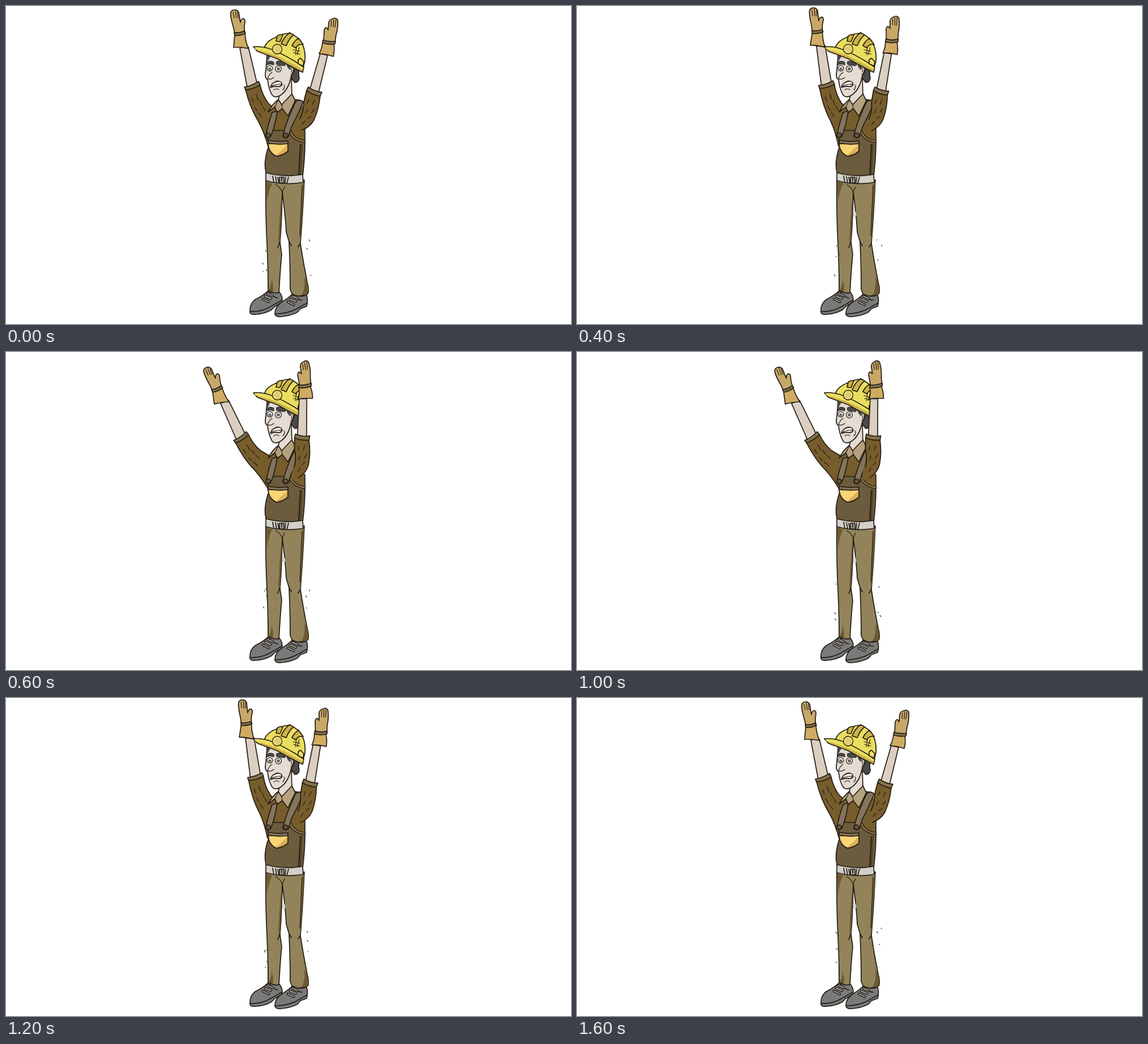
Recreate the animation shown at these times as an HTML page. Size 998 px wide and 561 px high, loop 1810 ms.

```html
<!DOCTYPE html>
<html lang="en">
<head>
<meta charset="utf-8">
<title>Worker waving</title>
<style>
  html, body { margin: 0; width: 100%; height: 100%; overflow: hidden; background: #fff; }
  svg { display: block; width: 998px; height: 561px; }
  path, circle { stroke: #231d14; stroke-width: 1.7; stroke-linejoin: round; stroke-linecap: round; }
  .line { fill: none; }
  .flat { stroke: none; }
  .thin { fill: none; stroke-width: 1.2; }
  .glove { fill: #c8a868; }
  .cuff { fill: #d0ab63; }
  .skin { fill: #dbcfc2; }
  .face { fill: #e4dcd2; }
  .shirt { fill: #775d2c; }
  .band { fill: #83704a; }
  .bib { fill: #6c5b3d; }
  .strap { fill: #83745c; }
  .pants { fill: #92835a; }
  .shade { fill: #6c5930; stroke: none; }
  .boot { fill: #7b7a7b; }
  .hat { fill: #eade60; }
  .hatShade { fill: #cdb348; }
  .hair { fill: #4a494b; }
  .lace { stroke: #aaa9a8; stroke-width: 1.9; fill: none; }
</style>
</head>
<body>
<svg viewBox="0 0 998 561">
  <g id="left">
    <path class="skin" d="M413 74L426 143L444 139L428 72Z"/>
    <path class="shirt flat" d="M423 147L449 140Q453 158 463 171L479 186L482 235L463 248Q456 222 446 204Q431 180 423 147Z"/>
    <path class="line" d="M463 248Q456 222 446 204Q431 180 423 147M449 140Q453 158 463 171L479 186"/>
    <path class="thin" d="M434 162l3 8M442 156l3 10M439 178l5 7M448 167l4 9M446 188l6 8M454 178l4 7"/>
    <path class="band" d="M421 143Q434 141 446 133L449 139Q437 147 423 148Z"/>
    <path class="glove" d="M404 48Q402 38 399 28Q396 16 397 11Q399 7 403 7Q408 6 411 11L414 29Q415 23 419 22Q423 23 422 29Q420 38 422 47Z"/>
    <path class="thin" d="M401 11L403 21M405 9L407 21M409 10L410 21"/>
    <path class="cuff" d="M404 51L402 73Q415 72 428 75Q423 62 422 49Z"/>
    <path class="band" d="M403 47Q413 48 421 44L423 48Q414 53 404 52Z"/>
  </g>

  <g id="legs">
    <path class="pants" d="M459 306Q458 360 461 420Q463 460 463 503Q472 510 482 508Q484 470 487 438L484 417Q487 380 488 328Q494 375 495 399L500 416Q502 460 502 500L506 510Q520 514 533 508Q536 501 532 487Q525 452 520 419Q524 370 527 307Z"/>
    <path class="shade" d="M460 310L470 313Q464 325 461 346ZM487 332L484 420L481 424Q482 375 487 332ZM524 313L527 310L520 419L519 404ZM464 502Q470 490 469 482Q473 492 471 508ZM522 510Q529 500 527 478Q534 490 534 502L531 510Z"/>
    <path class="line" d="M484 417L480 426M500 416L504 423M520 419L516 425"/>
    <path class="thin" d="M476 315Q484 319 488 328L492 319M523 316L519 405"/>
    <path class="boot" d="M464 502Q454 511 440 518Q430 526 431 539Q430 545 441 544Q457 543 469 536L475 530L487 523Q490 514 483 505Q476 509 464 502Z"/>
    <path class="boot" d="M506 508Q498 516 486 523Q475 531 475 542Q475 549 486 548Q502 547 515 540L520 534L531 530Q534 520 531 510Q518 515 506 508Z"/>
    <path class="line" d="M431 539Q450 540 466 531L487 519M475 543Q496 543 512 535L532 524M465 504Q472 514 480 515M508 510Q514 519 523 519"/>
    <path class="line" style="stroke-width:4.6" d="M454 517l10 5M458 512l10 4M462 507l9 4M498 522l10 5M502 517l10 4M506 512l9 4"/>
    <path class="lace" d="M454 517l10 5M458 512l10 4M462 507l9 4M498 522l10 5M502 517l10 4M506 512l9 4"/>
  </g>

  <g id="body">
    <path class="shirt flat" d="M464 186L480 172L505 163L519 166L527 183L528 246L463 249L458 226Z"/>
    <path class="line" d="M509 165L519 166M528 216L528 241"/>
    <path class="bib" d="M461 219L503 220Q508 235 528 241Q528 268 524 300Q490 305 463 298Q456 294 458 272Q460 257 464 248Z"/>
    <path class="line" style="stroke-width:5" d="M502 221Q507 236 527 239"/>
    <path class="line" style="stroke:#93794d;stroke-width:2.4" d="M502 221Q507 236 527 239"/>
    <path class="shade" style="fill:#51432c" d="M520 243L524 243L521 298L517 298Z"/>
    <path class="line" d="M520 244L517 297"/>
    <path class="flat" fill="#fbd474" d="M463 244L498 244L498 256Q489 264 478 265Q466 261 463 244Z"/>
    <path class="flat" fill="#dcb058" d="M498 244V256Q489 264 476 265Z"/>
    <path class="line" d="M463 244Q465 260 478 265Q489 264 498 256V244"/>
    <path class="strap" d="M463 237Q480 240 498 238V243Q480 245 463 242Z"/>
    <path fill="#d3d0c9" d="M459 294Q490 303 524 297L525 311Q490 317 459 308Z"/>
    <path class="line" d="M471 300l2 11M476 301l2 11M480 302l2 10M494 302l-1 10M499 302l-3 11"/>
    <path fill="#aaa79f" d="M483 302h8v10h-8zM487 303v6"/>
  </g>

  <g id="head">
    <path class="hair" d="M494 96L518 113Q516 120 518 127Q517 135 510 135L503 126Z"/>
    <path class="face" d="M504 122L505 160L487 182L480 169L483 157Z"/>
    <path fill="#b5a17f" d="M481 165L487 174L505 155L511 167L498 194L488 181L479 188L475 178L463 187Q471 172 481 165Z"/>
    <path class="thin" d="M481 165L475 178M487 174L488 181"/>
    <path class="face" d="M461 85Q460 102 459 114Q456 127 462 130Q464 147 470 157Q475 163 484 158Q499 149 504 123Q510 116 509 108L498 94Z"/>
    <path class="hair flat" d="M461 84L468 87L462 98L460 99ZM492 93L510 106L507 109Q503 105 501 113L497 108Z"/>
    <path class="thin" d="M502 112Q507 106 508 111Q507 119 503 121M505 112L504 117"/>
    <circle cx="466" cy="110" r="4.8" fill="#fff" style="stroke-width:1.3"/>
    <circle cx="481" cy="111" r="5.4" fill="#fff" style="stroke-width:1.3"/>
    <circle class="flat" cx="466" cy="111" r="2.8" fill="#6b6865"/>
    <circle class="flat" cx="481" cy="111" r="3" fill="#6b6865"/>
    <path class="hair" style="stroke-width:1" d="M460 100Q466 95 473 99L473 104Q466 101 460 104ZM478 98Q486 95 494 101L493 105Q486 106 478 103Z"/>
    <path class="thin" d="M470 117Q464 121 462 128Q467 131 473 126M473 148Q479 144 482 148M491 139Q494 143 489 148"/>
    <path fill="#4a3f3a" style="stroke-width:1.2" d="M467 143Q469 135 479 132Q487 132 488 138Q486 144 478 142Q472 142 467 144Z"/>
    <path class="flat" fill="#fff" d="M469 140Q473 135 480 134Q486 133 486 137Q478 137 469 140ZM471 141Q479 138 486 139Q484 142 478 140.500Z"/>
    <path class="hat" d="M456 75Q459 62 477 55Q490 48 501 48Q512 52 520 61Q530 76 528 97L524 112Q491 91 456 75Z"/>
    <path class="hatShade" d="M477 62L479 53Q484 49 489 51L484 63ZM486 67Q491 54 501 47L508 51Q500 57 495 70ZM505 70Q510 60 517 57L525 68Q516 66 512 74Z"/>
    <path class="thin" d="M507 77l12 3M508 82l11 3M513 73l-2 13M518 73l-4 13"/>
    <path class="hatShade" d="M437 72Q452 70 473 78Q502 91 526 108L524 117Q501 106 479 93Q460 86 444 80Z"/>
    <path class="hat flat" d="M439 73Q452 71 473 79Q502 92 525 109L524 112Q499 97 476 87Q455 80 440 76Z"/>
    <path class="hat" d="M516 95L520 92L526 98L525 106L516 102Z"/>
    <circle class="hat" cx="479" cy="76" r="8.500" style="stroke-width:1.3"/>
    <circle class="flat" cx="479" cy="76" r="5.500" fill="#dccb7c"/>
  </g>

  <g id="straps">
    <path class="strap" d="M470 188L479 185Q476 210 468 229Q464 235 459 230Q461 215 470 188Z"/>
    <path class="strap" d="M511 170Q517 163 525 169Q516 191 504 214L499 230Q494 235 489 230Q493 208 511 170Z"/>
    <circle cx="463" cy="228" r="4" fill="#66563d"/>
    <circle cx="494" cy="228" r="4" fill="#66563d"/>
  </g>

  <g id="right">
    <path class="skin" d="M555 84L537 146L552 153L568 87Z"/>
    <path class="shirt flat" d="M531 149L555 158Q553 181 544 201Q537 214 522 220L508 219Q515 199 524 183Q524 166 531 149Z"/>
    <path class="line" d="M519 199Q526 185 526 170L531 149M555 158Q553 181 544 201Q537 214 522 219"/>
    <path class="thin" d="M535 165l-3 7M545 166l-4 8M533 182l-4 7M545 182l-5 6M539 195l-6 4M528 203l-5 6"/>
    <path class="band" d="M534 143Q545 151 558 152L555 159Q541 157 531 149Z"/>
    <path class="glove" d="M561 62L562 43Q563 38 566 38L569 42L570 29Q572 23 576 23Q583 19 586 25Q587 38 583 51L581 64Z"/>
    <path class="thin" d="M575 26L574 36M579 24L578 37M583 24L581 37"/>
    <path class="cuff" d="M559 65Q558 76 553 84Q567 85 578 89Q581 78 579 67Z"/>
    <path class="band" d="M560 60Q571 64 582 62L581 67Q570 69 559 65Z"/>
  </g>

  <path id="smudge" class="line" style="stroke:#d6d4d4;stroke-width:5" d="M490 364l1 5"/>
  <path id="flecks" class="line" style="stroke-width:1.1"/>
</svg>
<script>
  const el = id => document.getElementById(id);
  const LOOP = 1810, STEP = 200;
  // [left, right] arm swing in degrees; the sequence runs out and back
  const poses = [[0, 0], [9, 9.2], [3.6, -4.6], [-13, -13.4], [3, -5.4]];

  function random(seed) {
    return () => (seed = (seed * 16807) % 2147483647) / 2147483647;
  }

  // Small stray marks beside the legs, different at every step
  function flecks(step) {
    const next = random(step * 7919 + 431);
    let d = "";
    for (let i = 0; i < 7; i++) {
      const x = (i < 4 ? 453 : 529) + next() * 9;
      const y = 405 + next() * 70;
      d += `M${x} ${y}l${next() * 2} ${next() * 3}`;
    }
    return d;
  }

  let shown = -1;
  function draw() {
    const step = Math.min(8, Math.floor((performance.now() % LOOP) / STEP));
    if (step !== shown) {
      shown = step;
      const [left, right] = poses[4 - Math.abs(4 - step)];
      el("left").setAttribute("transform", `rotate(${left} 468 232)`);
      el("right").setAttribute("transform", `rotate(${right} 530 241)`);
      el("smudge").style.opacity = step ? 1 : 0;
      el("flecks").setAttribute("d", flecks(step));
    }
    requestAnimationFrame(draw);
  }
  draw();
</script>
</body>
</html>
```
